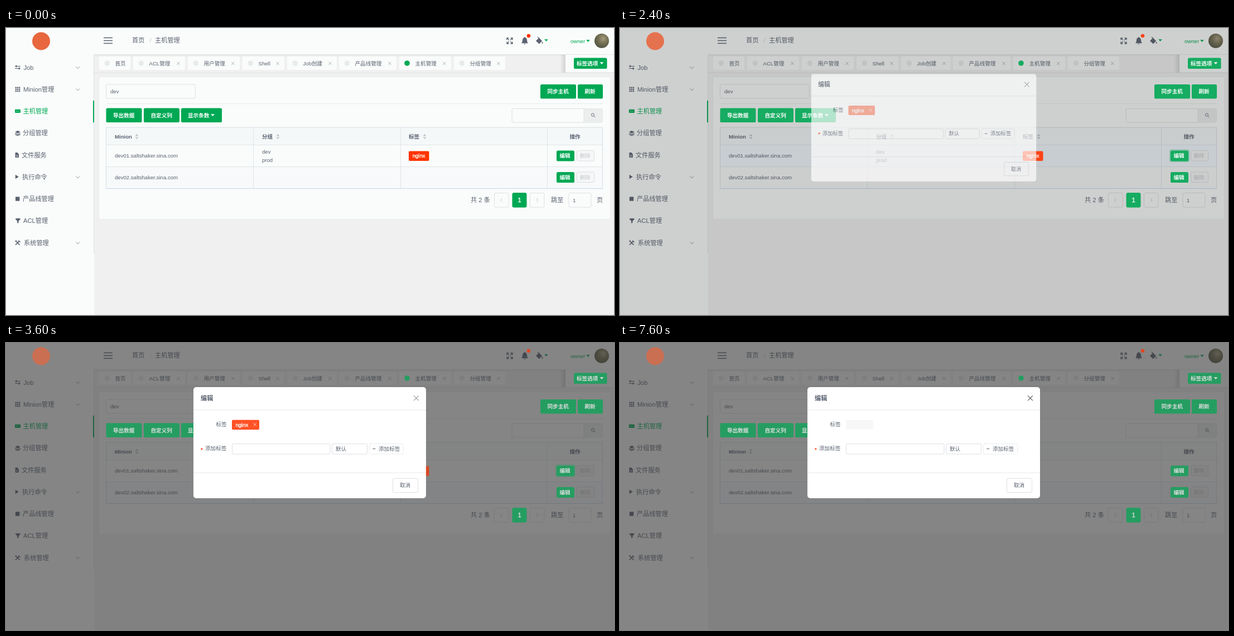
Write an HTML page that moves like this. It is 1090x514 px and loops after 8000 ms.

```html
<!DOCTYPE html>
<html lang="zh-CN">
<head>
<meta charset="utf-8">
<title>主机管理</title>
<style>
html, body { margin: 0; width: 100%; height: 100%; overflow: hidden; background: #f0f0f0; }
svg { display: block; width: 1090px; height: 514px; font-family: "Liberation Sans", "Noto Sans CJK SC", "Noto Sans CJK", sans-serif; }
text { white-space: pre; }
</style>
</head>
<body>
<svg id="stage" viewBox="0 0 1090 514" xmlns="http://www.w3.org/2000/svg"></svg>
<script>
const LOOP = 8000, STEP = 100;
const GREEN = '#00a854', RED = '#ff3300', INK = '#5a6270', LINE = '#dcdfe3', PAPER = '#fafcfb', PALE = '#e8ebec';
const SMALL = 9.6, BIG = 11.2;

// Drawing helpers; text is placed by its vertical centre
const text = (x, cy, s, o = {}) => {
  const size = o.size || SMALL;
  return `<text x="${x}" y="${cy + size * .36}" font-size="${size}" fill="${o.fill || INK}" font-weight="${o.weight || 400}"` +
    `${o.mid ? ' text-anchor="middle"' : ''} ${o.more || ''}>${s}</text>`;
};
const rect = (x1, y1, x2, y2, fill, r = 0, more = '') =>
  `<rect x="${x1}" y="${y1}" width="${x2 - x1}" height="${y2 - y1}" rx="${r}" fill="${fill}" ${more}/>`;
const box = (x1, y1, x2, y2, fill = 'none', stroke = LINE, more = '') =>
  rect(x1 + .5, y1 + .5, x2 - .5, y2 - .5, fill, 2.5, `stroke="${stroke}" ${more}`);
const path = (d, stroke, w = 1, fill = 'none', more = '') =>
  `<path d="${d}" stroke="${stroke}" stroke-width="${w}" fill="${fill}" ${more}/>`;
const shape = (d, fill) => path(d, 'none', 0, fill);
const dot = (x, y, r, fill, more = '') => `<circle cx="${x}" cy="${y}" r="${r}" fill="${fill}" ${more}/>`;
const cross = (x, y, r, stroke, w = .9, more = '') =>
  path(`M${x - r} ${y - r}l${2 * r} ${2 * r}M${x + r} ${y - r}l${-2 * r} ${2 * r}`, stroke, w, 'none', more);
const caret = (x, y, fill) => shape(`M${x - 3.4} ${y - 1.8}h6.8l-3.4 3.8z`, fill);
const group = (id, body, more = '') => `<g id="${id}" ${more}>${body}</g>`;
const button = (x1, y1, x2, y2, tx, label) =>
  rect(x1, y1, x2, y2, GREEN, 2.6) + text(tx, (y1 + y2) / 2, label, { fill: '#fff', weight: 700 });
const white = { fill: '#fff', more: 'stroke="#fff" stroke-width=".35"' };

function menuIcon(i, y, c) {
  switch (i) {
    case 0: return path(`M17.5 ${y - 2}H26M16 ${y + 2}H24.5`, c, 1.2) +
      shape(`M16 ${y - 2}l3.2-2.6v5.2zM26 ${y + 2}l-3.2-2.6v5.2z`, c);
    case 1: return [0, 1, 2].map(a => [0, 1, 2].map(b =>
      rect(16.6 + a * 3.2, y - 4.2 + b * 3.2, 18.9 + a * 3.2, y - 1.9 + b * 3.2, c)).join('')).join('');
    case 2: return rect(16, y - 3.2, 26, y + 3, c, 1) + path(`M18 ${y}h6`, PAPER, .9, 'none', 'stroke-dasharray="1 1"');
    case 3: return shape(`M21 ${y - 4.6}l4.8 2.6-4.8 2.6-4.8-2.6z`, c) +
      path(`M16.3 ${y + .2}l4.7 2.4 4.7-2.4M16.3 ${y + 2.2}l4.7 2.4 4.7-2.4`, c, 1.1);
    case 4: return shape(`M16.6 ${y - 4.4}h3.6l2.8 2.8v6h-6.4z`, c) + path(`M18 ${y + .6}h3.6M18 ${y + 2.5}h3.6`, PAPER, .7);
    case 5: return shape(`M16.8 ${y - 4}l6 3.8-6 3.8z`, c);
    case 6: return rect(17, y - 3.7, 24.4, y + 3.7, c);
    case 7: return shape(`M16.4 ${y - 3.4}q5-2 10 0l-3.8 4v2.6l-2.4 1.6v-4.2z`, c);
    default: return path(`M17 ${y + 4}l6.6-6.6M17.6 ${y - 3}l7 7`, c, 1.7) +
      path(`M22.4 ${y - 4}l3.2 3.2M16.4 ${y - 2}l2.4-2.4`, c, 1.3);
  }
}

function sidebar() {
  const items = [['Job', 31.5, 1], ['Minion管理', 31, 1], ['主机管理', 30.5], ['分组管理', 30], ['文件服务', 28],
    ['执行命令', 29, 1], ['产品线管理', 30], ['ACL管理', 31], ['系统管理', 32, 1]];
  return rect(0, 0, 158, 514, PAPER) + rect(157, 48, 158, 404, '#dfe3e5') + rect(156, 130, 158, 169, GREEN) +
    items.map(([label, x, open], i) => {
      const y = 70.5 + i * 39.25, c = i === 2 ? GREEN : INK;
      return menuIcon(i, y, c) + text(x, y, label, { size: BIG, fill: c }) +
        (open ? path(`M125.3 ${y - 1.2}l3.4 3.4 3.4-3.4`, '#868d96', 1) : '');
    }).join('');
}

function header() {
  const corners = [[-1, -1], [1, -1], [-1, 1], [1, 1]].map(([a, b]) =>
    path(`M${903 + a * 1.2} ${23 + b * 1.2}L${903 + a * 4.8} ${23 + b * 4.8}M${903 + a * 5} ${23 + b * 1.6}v${b * 3.4}h${-a * 3.4}`, INK, 1.3)).join('');
  return rect(158, 0, 1090, 48, PAPER) + path('M175 17.5h16M175 22.5h16M175 27.5h16', INK, 1.4) +
    text(226, 22, '首页', { size: BIG }) + text(257.5, 22, '/', { size: BIG, fill: '#c8ccd0' }) +
    text(267, 22, '主机管理', { size: BIG, weight: 500 }) + corners +
    shape('M924 27.3q2-1.6 2-5.2 0-4 3-4.8 0-1.4 1-1.4t1 1.4q3 .8 3 4.8 0 3.6 2 5.2zM928.4 28.2h3.2q-.4 1.4-1.6 1.4t-1.6-1.4z', INK) +
    shape('M950 23l5.6-5.4 5.6 5.6-5.4 5.2zM961.6 24.6q2 2.6 0 3.6-2-1 0-3.6z', INK) +
    path('M953 16l3.4 3.4', INK, 1.1) + caret(968.5, 22, GREEN) +
    text(1012, 23.5, 'owner', { fill: GREEN }) + caret(1043.5, 23, GREEN) +
    dot(1068, 23, 13, 'url(#photo)');
}

const tabs = [['首页', 167, 223], ['ACL管理', 228, 321], ['用户管理', 326, 419], ['Shell', 424, 499],
  ['Job创建', 504, 593], ['产品线管理', 597, 700], ['主机管理', 705, 798], ['分组管理', 803, 895]];

function tabBar() {
  return rect(158, 48, 1090, 80, '#f0f0f0') + rect(158, 47, 1090, 48, '#e4e6e6') + rect(158, 48, 1090, 50, '#e8e9e9') +
    rect(158, 79, 1090, 81, '#e8e9e9') +
    tabs.map(([label, x1, x2], i) => rect(x1, 51, x2, 75, PAPER, 2) +
      (i === 6 ? '' : dot(x1 + 14.3, 63, 4.8, PALE)) + text(x1 + 28.5, 63.5, label) +
      (i ? cross(x2 - 12, 63.5, 2.7, '#9aa0a6', .8) : '')).join('') +
    rect(993, 48, 1003, 80, 'url(#edge)') + rect(1003, 48, 1090, 79, PAPER);
}

function tableRow(y, host) {
  return text(195, y, host) + box(1023, y - 10, 1055, y + 9.5, '#f6f7f7') + text(1028.5, y, '删除', { fill: '#c3c7cc' });
}

function card() {
  const sort = x => shape(`M${x - 3} 193.4h6l-3-3.6zM${x - 3} 195.4h6l-3 3.6z`, '#c0c5ca');
  const head = { weight: 700 }, big = { size: BIG };
  return rect(166, 87, 1083.5, 342.5, '#e9ebeb', 3) + rect(167, 88, 1083, 342, PAPER, 3) +
    box(179, 100.5, 340, 126.5, PAPER) + text(187, 113.5, 'dev') + rect(180, 135, 1070, 136, PALE) +
    box(906.5, 144, 1070, 169.5, PAPER) + rect(1036, 144.5, 1069.5, 169, '#eceeee', 2) + rect(1035.5, 144, 1036.5, 169, LINE) +
    dot(1052, 155.5, 2.6, 'none', `stroke="${INK}" stroke-width=".9"`) + path('M1054 157.5l2.4 2.4', INK, 1) +
    rect(180, 178, 1070, 210, '#f5f8f9') + rect(180, 248, 1070, 287, '#f7f9fa') +
    rect(180, 210, 1070, 248, '#e9f6ff', 0, 'id="rowHover"') +
    path('M180 209.5h890M180 248.5h890M443.5 178v109M707.5 178v109M970.5 178v109', '#e0e5ea') +
    path('M179.5 287.5V178h890V287.5', '#d6dee6') + path('M179 287.5h891', '#c6d6ea') +
    text(195, 194.5, 'Minion', head) + text(459, 194.5, '分组', head) + text(722, 194.5, '标签', head) +
    text(1020, 194.5, '操作', { weight: 700, mid: 1 }) + sort(234.5) + sort(487.5) + sort(750.5) +
    tableRow(229, 'dev01.saltshaker.sina.com') + tableRow(267.5, 'dev02.saltshaker.sina.com') +
    text(459, 222, 'dev') + text(459, 236.5, 'prod') +
    text(833, 308, '共 2 条', big) + box(875, 295, 901.5, 321.5) + box(939, 295, 965.5, 321.5) +
    path('M889.8 305l-3.2 3.2 3.2 3.2M950.8 305l3.2 3.2-3.2 3.2', '#b9bec4') +
    text(977, 308, '跳至', big) + box(1008.5, 295, 1049.5, 321.5, PAPER) + text(1016, 308.3, '1') + text(1059, 308, '页', big);
}

// Coloured parts keep more of their strength while the page is dimmed
function accents() {
  return dot(63, 23.5, 16, '#e8673f') + dot(937, 14, 3.3, RED) + dot(719, 63, 4.8, GREEN) +
    button(1018, 53.5, 1077.5, 73, 1023, '标签选项') + caret(1068, 63, '#fff') +
    button(958, 101, 1022, 126.5, 970.5, '同步主机') + button(1025, 101, 1070, 126.5, 1037.5, '刷新') +
    button(179.5, 143.5, 243.5, 169, 192, '导出数据') + button(247, 143.5, 311, 169, 259.5, '自定义列') +
    button(314, 143.5, 387, 169, 326, '显示条数') + caret(370.5, 156, '#fff') +
    group('rowTag', rect(722, 220.5, 758.5, 238, RED, 2) + text(728.7, 229, 'nginx', white)) +
    rect(986, 218.5, 1020, 239, 'none', 3, `id="ring" stroke="${GREEN}" stroke-opacity=".35" stroke-width="2"`) +
    button(987, 219.5, 1019, 238.5, 992.5, '编辑') + rect(987, 219.5, 1019, 238.5, '#fff', 2.5, 'id="press"') +
    button(987, 258, 1019, 277, 992.5, '编辑') +
    rect(907.5, 295, 933.5, 321.5, GREEN, 3) + text(920.5, 308.3, '1', { ...white, size: BIG, mid: 1 });
}

function modal() {
  return rect(336, 79, 753, 278, '#fff', 5) + text(349, 98.5, '编辑', { size: BIG, weight: 700 }) +
    cross(735.5, 98.7, 4.4, '#999', 1.1, 'id="closeX"') + rect(336, 119.5, 753, 120.5, PALE) + rect(336, 232, 753, 233, PALE) +
    text(376.5, 146, '标签') + rect(405, 138, 454, 155, '#f7f7f7', 1, 'id="ghost"') +
    group('tag', rect(405, 137.7, 454, 155.3, RED, 2) + text(411.4, 146.3, 'nginx', white) +
      cross(446, 146, 2.9, '#fff', .95, 'id="tagX"')) +
    text(349, 190.5, '*', { fill: RED, weight: 700 }) + text(357, 189, '添加标签') +
    box(405, 180, 581.5, 199.5, '#fff') + box(584, 180, 648, 199.5, '#fff') +
    box(584, 180, 648, 199.5, 'none', GREEN, 'id="selectHover"') + text(591, 189.5, '默认') +
    box(651, 180, 713, 199.5, '#fff', LINE, 'stroke-dasharray="2.4 1.6"') + path('M657.3 189.5h5', INK) + text(668, 189.5, '添加标签') +
    box(693, 242, 739, 268, '#fff') + text(706, 255, '取消') +
    group('cancelHover', box(693, 242, 739, 268, '#fff', '#33b976') + text(706, 255, '取消', { fill: '#33b976' }));
}

function message() {
  return rect(503, 18, 599, 47, '#000', 3, 'opacity=".08"') + rect(504, 18, 598.5, 45.5, '#fff', 3) +
    dot(521, 32, 5.2, '#12bd62') + path('M518.6 32.1l1.8 1.8 3.2-3.4', '#fff', 1.2) + text(535, 32, '删除成功！');
}

const stage = document.getElementById('stage');
stage.innerHTML = `<defs>
  <radialGradient id="photo" cx=".6" cy=".35" r=".75"><stop offset="0" stop-color="#a39a7c"/><stop offset=".5" stop-color="#6f6b50"/><stop offset="1" stop-color="#4a5140"/></radialGradient>
  <linearGradient id="edge"><stop offset="0" stop-color="#888" stop-opacity="0"/><stop offset="1" stop-color="#888" stop-opacity=".28"/></linearGradient>
  </defs>` + rect(0, 0, 1090, 514, '#f0f0f0') + header() + tabBar() + sidebar() + card() +
  rect(0, 0, 1090, 514, '#373737', 0, 'id="mask"') + group('accents', accents()) +
  group('modal', modal()) + group('message', message());

const el = id => document.getElementById(id);
const fade = (id, v) => el(id).setAttribute('opacity', v);

// Piecewise linear value through time, value pairs
function track(t, ...p) {
  if (t <= p[0]) return p[1];
  for (let i = 2; i < p.length; i += 2)
    if (t <= p[i]) return p[i - 1] + (p[i + 1] - p[i - 1]) * (t - p[i - 2]) / (p[i] - p[i - 2]);
  return p[p.length - 1];
}

function render(t) {
  fade('rowHover', track(t, 500, 0, 700, 1, 2300, 1, 2500, 0));
  fade('press', track(t, 1800, 0, 2000, .2, 2200, .2, 2300, 0));
  fade('ring', track(t, 1900, 0, 2000, 1, 4000, 1, 4100, 0));
  fade('rowTag', t < 4500 ? 1 : 0);

  const dim = track(t, 2200, 0, 2300, .05, 2400, .37, 2500, .73, 2600, 1);
  fade('mask', dim * .6);
  fade('accents', 1 - dim * .28);

  const open = track(t, 2200, 0, 2300, .2, 2400, .68, 2500, 1);
  fade('modal', open);
  el('modal').setAttribute('transform', `translate(544.5 178.5) scale(${.9 + .1 * open}) translate(-544.5 -178.5)`);

  fade('tag', track(t, 2300, 0, 2400, .5, 2500, .79, 2700, 1, 3500, 1, 3600, .85, 4400, .85, 4800, 0));
  fade('tagX', t < 3800 ? .7 : 1);
  fade('ghost', t < 4500 ? 0 : 1);
  fade('selectHover', track(t, 2900, 0, 3100, .8, 3300, 0));
  fade('cancelHover', track(t, 5000, 0, 5300, 1, 7100, 1, 7400, 0));
  el('closeX').setAttribute('stroke', t < 7600 ? '#999' : '#555');

  const shown = track(t, 4200, 0, 4500, 1, 5600, 1, 5900, 0);
  fade('message', shown);
  el('message').setAttribute('transform', `translate(0 ${-28 * (1 - shown)})`);
}

const start = performance.now();
function tick() {
  const t = (performance.now() - start) % LOOP;
  render(Math.floor(t / STEP) * STEP);
  requestAnimationFrame(tick);
}
tick();
</script>
</body>
</html>
```
